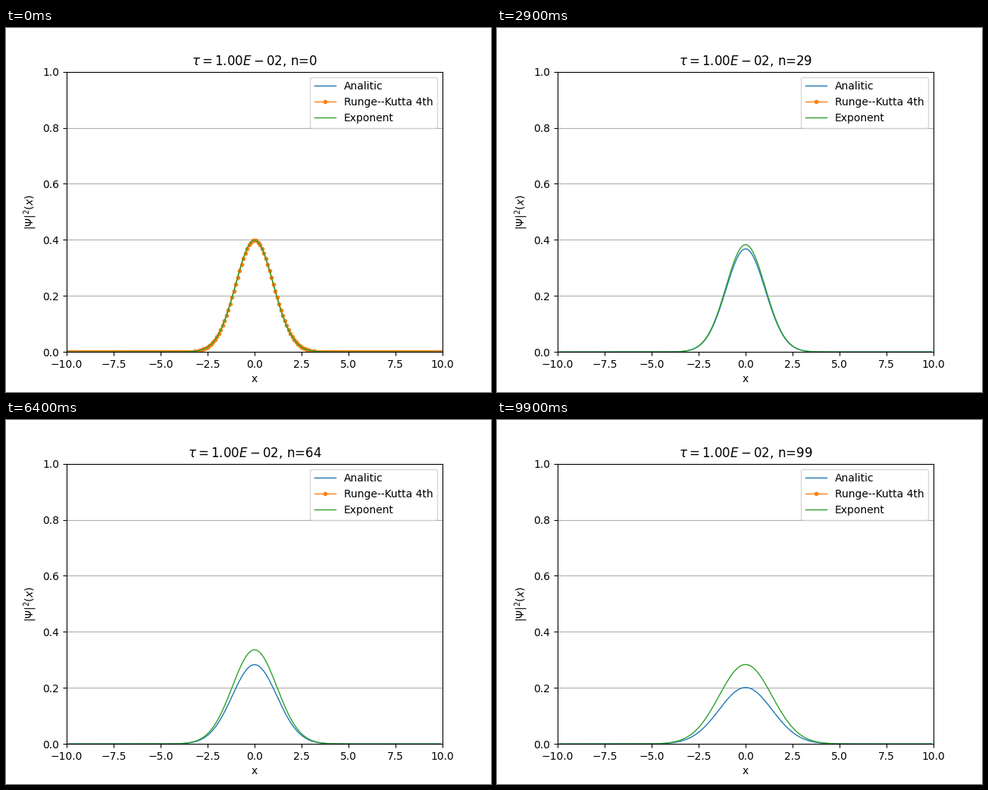
Recreate the animation shown at these times as a matplotlib script. Size 640x480 px, loop 10000 ms.

```python
import numpy as np
import matplotlib.pyplot as plt
from matplotlib.animation import FuncAnimation

FRAMES, INTERVAL = 100, 100
TAU, DX = 0.01, 0.1
N_REF = 19                      # step at which the instability is described

k = np.arange(-99, 100)
x = k * DX
sign = np.where(k % 2, -1, 1)

# RK4 amplification of the fastest growing grid mode
z = -4j * TAU / DX**2
growth = 1 + z + z**2 / 2 + z**3 / 6 + z**4 / 24


def density(t, power):
    s = 1 + t * t
    return np.exp(-x**2 / (2 * s)) / np.sqrt(2 * np.pi) / s**power


def bump(center, amp, var):
    return amp * np.exp(-(x - center)**2 / (2 * var))


# Rounding noise grows as a few lumps with alternating phase
core = (bump(-2.02, 0.27 - 1.03j, 0.62) + bump(0.07, 0.19 + 0.37j, 0.236)
        + bump(1.55, -0.01 - 0.46j, 0.29) + bump(3.2, -0.02 + 0.155j, 0.25))


def edge_wave(n):
    y = 10 - np.abs(x)
    width = 1.578 * np.sqrt(max(n, 1) / N_REF)
    return np.exp(4.86 + 8.2 * np.log(y) - (y / width)**2.5)


def runge_kutta(n):
    noise = (core + edge_wave(n)) * growth**(n - N_REF)
    psi = np.sqrt(density(n * TAU, 0.5)) + sign * noise
    return np.minimum(np.abs(psi)**2, 1e4)


fig, ax = plt.subplots(figsize=(6.4, 4.8), dpi=100)
analytic, = ax.plot([], [], lw=1, label="Analitic")
rk4, = ax.plot([], [], ".-", lw=1, label="Runge--Kutta 4th")
exponent, = ax.plot([], [], lw=1, label="Exponent")
ax.set(xlim=(-10, 10), ylim=(0, 1), xlabel="x", ylabel=r"$|\Psi|^2(x)$")
ax.grid(axis="y")
ax.legend(loc="upper right")
title = ax.set_title("")


def update(n):
    t = n * TAU
    analytic.set_data(x, density(t, 1))
    rk4.set_data(x, runge_kutta(n))
    exponent.set_data(x, density(t, 0.5))
    title.set_text(rf"$\tau=1.00E-02$, n={n}")
    return analytic, rk4, exponent, title


anim = FuncAnimation(fig, update, frames=FRAMES, interval=INTERVAL,
                     repeat=True, repeat_delay=0, blit=False)
plt.show()
```
